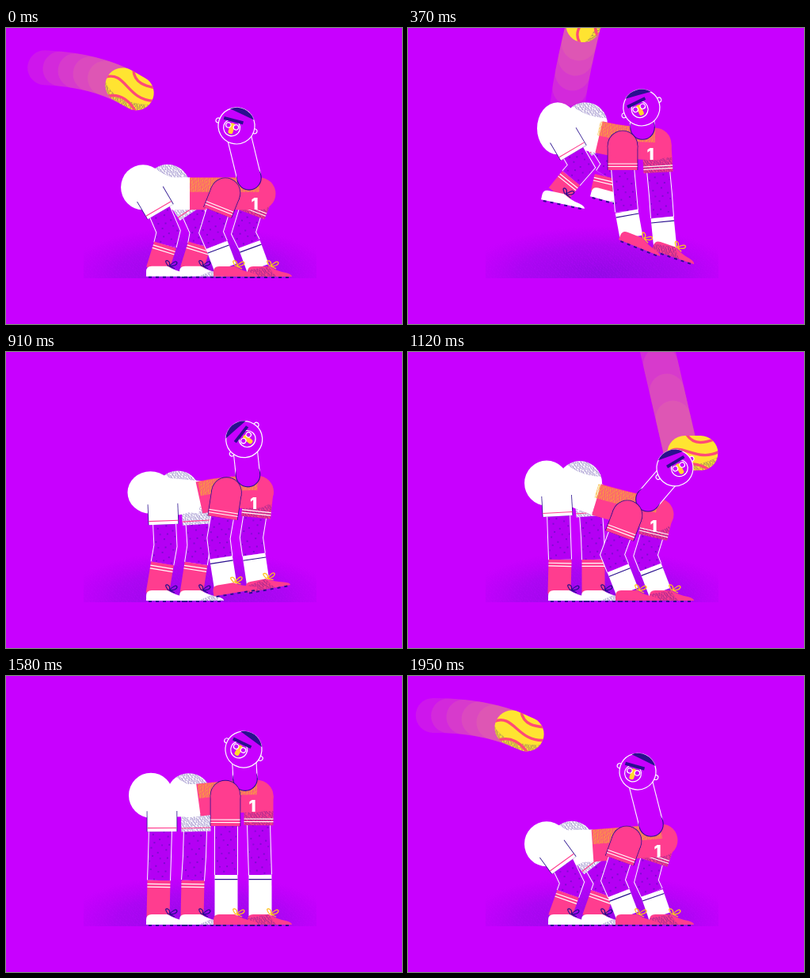
An HTML page without scripts for the animation above (2000 ms loop, 500 by 375 pixels).

```html
<!DOCTYPE html>
<html lang="en">
<head>
<meta charset="utf-8">
<title>Four-legged footballer</title>
<style>
html, body { margin: 0; width: 100%; height: 100%; overflow: hidden; background: #c800ff; }
svg { display: block; width: 100vw; height: 100vh; }
use { fill: none; }
.rim { stroke: #fff; stroke-width: 30; }
.skin { stroke: #b400f4; stroke-width: 28; }
.freckle { stroke: url(#freckles); stroke-width: 26; }
.pink { stroke: #ff3d8f; stroke-width: 29; }
.white { stroke: #fff; stroke-width: 29; }
.bands { stroke: #fff; stroke-width: 29; stroke-dasharray: 0 4 1.2 2.5 1.2 999; }
.band { stroke: #2a0f8f; stroke-width: 29; stroke-dasharray: 0 5 1.2 999; }
.edge { stroke: #2a0f8f; stroke-width: 38.6; }
.shorts { stroke: #fff; stroke-width: 37; }
.hem { stroke: #ff3d8f; stroke-width: 37; stroke-dasharray: 0 4 1.1 999; }
.sleeve { stroke: #ff3d8f; stroke-width: 37; marker-end: url(#knob); }
.sleeve-edge { marker-end: url(#knob-edge); }
.cuff { stroke: #fff; stroke-width: 37; stroke-dasharray: 0 4 1.1 2.4 1.1 999; }
.shade { stroke: url(#grain); stroke-width: 37; }
.trail { fill: none; stroke: #f0b060; stroke-width: 44; stroke-linecap: round; stroke-linejoin: round; }
.trail use { stroke-opacity: .12; }
text { font: 900 20px Inter, Roboto, sans-serif; fill: #fff; text-anchor: middle; }
</style>
</head>
<body>
<svg viewBox="0 0 500 375" preserveAspectRatio="none">
<defs>
  <pattern id="grain" width="23" height="12" patternUnits="userSpaceOnUse" patternTransform="rotate(-24)">
    <path d="M0 1H23M-3 3H23M-8 5H23M-1 7H23M-6 9H23M-4 11H23" stroke="#2a0f8f" stroke-width="1.1" stroke-dasharray="1.1 1.7 1.2 2.6 1 1.2"/>
  </pattern>
  <pattern id="gold" width="23" height="12" patternUnits="userSpaceOnUse" patternTransform="rotate(17)">
    <path d="M0 1H23M-3 3H23M-8 5H23M-1 7H23M-6 9H23M-4 11H23" stroke="#f7b52e" stroke-width="1.7" stroke-dasharray="2 1 1.4 .8 2.4 1.2"/>
  </pattern>
  <pattern id="freckles" width="19" height="17" patternUnits="userSpaceOnUse" patternTransform="rotate(8)">
    <path d="M3 2v2M12 7v2M6 12v2M16 14v1.6" stroke="#4a0fb0" stroke-width="1"/>
  </pattern>
  <radialGradient id="dusk" cx=".5" cy=".95" r=".6">
    <stop offset="0" stop-color="#7a10e0" stop-opacity=".55"/>
    <stop offset=".6" stop-color="#8a10e8" stop-opacity=".38"/>
    <stop offset="1" stop-color="#a808f2" stop-opacity="0"/>
  </radialGradient>
  <radialGradient id="fade" cx=".5" cy=".9" r=".55">
    <stop offset="0" stop-color="#fff" stop-opacity=".3"/>
    <stop offset="1" stop-color="#fff" stop-opacity="0"/>
  </radialGradient>
  <mask id="haze"><rect x="98" y="215" width="294" height="102" fill="url(#fade)"/></mask>
  <clipPath id="ballClip"><rect x="-32" y="-22" width="64" height="44" rx="22"/></clipPath>
  <marker id="knob" markerUnits="userSpaceOnUse" overflow="visible"><circle r="18.5" fill="#ff3d8f"/></marker>
  <marker id="knob-edge" markerUnits="userSpaceOnUse" overflow="visible"><circle r="19.3" fill="#2a0f8f"/></marker>
  <marker id="chest" markerUnits="userSpaceOnUse" overflow="visible"><circle r="20.5" fill="#ff3d8f"/></marker>
  <marker id="collar" markerUnits="userSpaceOnUse" overflow="visible"><circle r="15.8" fill="#2a0f8f"/></marker>
  <marker id="throat" markerUnits="userSpaceOnUse" overflow="visible"><circle r="14.7" fill="#c800ff"/></marker>

  <!-- flight paths run from exit back to entry, so each dash starts at the ball -->
  <path id="lob" pathLength="600" d="M260 -180L235 -60C213 30 203 70 200 115C140 38 20 45 -60 58"/>
  <path id="shot" pathLength="670" d="M760 128H345L288 -120"/>

  <g id="ball" clip-path="url(#ballClip)">
    <rect x="-32" y="-22" width="64" height="44" fill="#ffe431"/>
    <path d="M-32 6Q-10 26 34 4V24H-32Z" fill="url(#grain)"/>
    <path d="M-34 2C-16 -18 4 14 34 -2M-8 -24C2 -8 18 -14 30 -18M-22 24C-8 8 10 14 22 22" fill="none" stroke="#ff4a78" stroke-width="3.4"/>
  </g>

  <g id="shoe">
    <path d="M0 0V-6Q0 -13 7 -13H27Q37 -7 48 -5Q56 -3 56 0Z"/>
    <path d="M3 1H54" stroke="#2a0f8f" stroke-width="2" stroke-dasharray="4 5"/>
  </g>
  <path id="lace" d="M28 -13Q22 -21 27 -20Q31 -18 29 -13Q38 -22 39 -17Q38 -13 29 -13L36 -10" fill="none" stroke-width="1.3"/>

  <!-- hind legs: n near, f far; c cloth, l leg, s sock -->
  <path id="hnc"><animate attributeName="d" dur="2s" repeatCount="indefinite" keyTimes="0;.185;.35;.56;.645;.79;.975;1" values="M195 233L178 204;M209 158L190 126;M209 229L208 190;M189 208L187 170;M193 214L190 178;M197 197L197 158;M197 240L178 214;M195 233L178 204"/></path>
  <path id="hnl"><animate attributeName="d" dur="2s" repeatCount="indefinite" keyTimes="0;.185;.35;.56;.645;.79;.975;1" values="M193 230L205 258L201 275;M208 156L219 175L206 190;M210 226L212 256L203 273;M190 205L191 235L192 263;M194 211L197 239L196 265;M195 194L194 228L193 259;M195 237L207 262L202 276;M193 230L205 258L201 275"/></path>
  <path id="hns"><animate attributeName="d" dur="2s" repeatCount="indefinite" keyTimes="0;.185;.35;.56;.645;.79;.975;1" values="M201 275L191 307;M206 190L189 211;M203 273L191 307;M192 263L191 307;M196 265L191 307;M193 259L192 307;M202 276L191 307;M201 275L191 307"/></path>
  <path id="hfc"><animate attributeName="d" dur="2s" repeatCount="indefinite" keyTimes="0;.185;.35;.56;.645;.79;.975;1" values="M235 234L215 204;M247 151L226 122;M252 229L250 190;M231 208L228 170;M236 214L234 178;M240 197L239 158;M237 240L215 212;M235 234L215 204"/></path>
  <path id="hfl"><animate attributeName="d" dur="2s" repeatCount="indefinite" keyTimes="0;.185;.35;.56;.645;.79;.975;1" values="M235 231L247 258L244 275;M246 150L260 172L250 188;M252 226L254 256L246 273;M231 205L233 235L234 263;M236 211L240 239L239 265;M239 194L238 228L236 259;M236 237L250 262L245 276;M235 231L247 258L244 275"/></path>
  <path id="hfs"><animate attributeName="d" dur="2s" repeatCount="indefinite" keyTimes="0;.185;.35;.56;.645;.79;.975;1" values="M244 275L234 307;M250 188L245 209;M246 273L234 307;M234 263L234 307;M239 265L234 307;M236 259L235 307;M245 276L234 307;M244 275L234 307"/></path>

  <!-- front legs -->
  <path id="fnc"><animate attributeName="d" dur="2s" repeatCount="indefinite" keyTimes="0;.185;.35;.56;.645;.79;.975;1" values="M267 234L277 209;M271 180L271 149;M280 187L280 148;M267 233L277 207;M273 196L272 161;M277 190L277 151;M267 234L276 209;M267 234L277 209"/></path>
  <path id="fnl"><animate attributeName="d" dur="2s" repeatCount="indefinite" keyTimes="0;.185;.35;.56;.645;.79;.975;1" values="M268 230L259 259L266 275;M271 177L274 210L276 232;M279 184L279 215L278 247;M268 230L258 257L265 274;M274 193L275 225L276 256;M278 187L278 220L278 252;M268 231L259 259L266 275;M268 230L259 259L266 275"/></path>
  <path id="fns"><animate attributeName="d" dur="2s" repeatCount="indefinite" keyTimes="0;.185;.35;.56;.645;.79;.975;1" values="M266 275L277 304;M276 232L282 265;M278 247L278 294;M265 274L277 304;M276 256L277 304;M278 252L278 304;M266 275L277 304;M266 275L277 304"/></path>
  <path id="ffc"><animate attributeName="d" dur="2s" repeatCount="indefinite" keyTimes="0;.185;.35;.56;.645;.79;.975;1" values="M309 236L319 210;M316 183L314 149;M322 184L322 148;M309 235L316 206;M315 197L313 167;M319 189L319 152;M310 236L319 209;M309 236L319 210"/></path>
  <path id="ffl"><animate attributeName="d" dur="2s" repeatCount="indefinite" keyTimes="0;.185;.35;.56;.645;.79;.975;1" values="M308 234L300 260L307 274;M316 180L319 212L321 240;M321 181L320 212L320 240;M308 232L300 258L306 273;M315 194L317 226L318 258;M319 186L320 220L321 252;M308 233L301 260L308 275;M308 234L300 260L307 274"/></path>
  <path id="ffs"><animate attributeName="d" dur="2s" repeatCount="indefinite" keyTimes="0;.185;.35;.56;.645;.79;.975;1" values="M307 274L318 304;M321 240L325 280;M320 240L319 284;M306 273L318 304;M318 258L319 304;M321 252L321 304;M308 275L318 304;M307 274L318 304"/></path>

  <path id="back"><animate attributeName="d" dur="2s" repeatCount="indefinite" keyTimes="0;.185;.35;.56;.645;.79;.975;1" values="M195 210L233 210;M195 128L242 138;M200 191L252 181;M190 168L239 187;M195 176L238 173;M200 158L244 157;M195 216L234 215;M195 210L233 210"/></path>
  <path id="torso"><animate attributeName="d" dur="2s" repeatCount="indefinite" keyTimes="0;.185;.35;.56;.645;.79;.975;1" values="M232 210Q276 210 320 210;M241 138Q275 146 312 147;M250 182Q285 155 320 148;M238 187Q275 198 315 206;M236 173Q275 168 312 167;M243 157Q280 152 317 152;M233 215Q276 212 320 208;M232 210Q276 210 320 210"/></path>
  <path id="neck"><animate attributeName="d" dur="2s" repeatCount="indefinite" keyTimes="0;.185;.35;.56;.645;.79;.975;1" values="M307 190L291 124;M296 126L295 101;M308 124L264 74;M303 187L337 147;M299 142L334 124;M302 130L300 93;M307 188L290 121;M307 190L291 124"/></path>
</defs>

<path d="M98 317V215H392V317Z" fill="url(#dusk)"/>
<rect x="98" y="215" width="294" height="102" fill="url(#grain)" mask="url(#haze)"/>

<!-- ball in flight -->
<g class="trail">
  <animate attributeName="stroke-dashoffset" begin="-.5s" dur="2s" repeatCount="indefinite" keyTimes="0;.06;.225;.25;.355;.435;.53;1" values="-600;-570;-390;-372;-311;-177;0;0"/>
  <use href="#lob" stroke-dasharray="35 999"/>
  <use href="#lob" stroke-dasharray="55 999"/>
  <use href="#lob" stroke-dasharray="75 999"/>
  <use href="#lob" stroke-dasharray="95 999"/>
  <use href="#lob" stroke-dasharray="115 999"/>
</g>
<g class="trail">
  <animate attributeName="stroke-dashoffset" dur="2s" repeatCount="indefinite" keyTimes="0;.45;.555;.56;.645;.75;1" values="-670;-670;-416;-402;-216;0;0"/>
  <use href="#shot" stroke-dasharray="60 999"/>
  <use href="#shot" stroke-dasharray="95 999"/>
  <use href="#shot" stroke-dasharray="130 999"/>
  <use href="#shot" stroke-dasharray="165 999"/>
  <use href="#shot" stroke-dasharray="200 999"/>
</g>
<g>
  <use href="#ball"/>
  <animateMotion begin="-.5s" dur="2s" repeatCount="indefinite" calcMode="linear" rotate="auto-reverse" keyTimes="0;.06;.225;.25;.355;.435;.53;1" keyPoints="1;.95;.65;.62;.518;.295;0;0"><mpath href="#lob"/></animateMotion>
</g>
<g>
  <use href="#ball"/>
  <animateMotion dur="2s" repeatCount="indefinite" calcMode="linear" rotate="auto-reverse" keyTimes="0;.45;.555;.56;.645;.75;1" keyPoints="1;1;.621;.6;.322;0;0"><mpath href="#shot"/></animateMotion>
</g>

<!-- far side -->
<use href="#hfl" class="rim"/><use href="#hfl" class="skin"/><use href="#hfl" class="freckle"/>
<use href="#hfs" class="pink"/><use href="#hfs" class="bands"/>
<g>
  <animateTransform attributeName="transform" type="translate" dur="2s" repeatCount="indefinite" keyTimes="0;.185;.35;.56;1" values="219 315;230 213;219 315;219 315;219 315"/>
  <animateTransform attributeName="transform" type="rotate" additive="sum" dur="2s" repeatCount="indefinite" keyTimes="0;.185;.35;.56;1" values="0;15;0;0;0"/>
  <use href="#shoe" style="fill:#fff"/><path d="M24 0L40 -7L56 0Z" fill="url(#grain)"/><use href="#lace" stroke="#2a0f8f"/>
</g>
<use href="#hfc" class="shorts"/><use href="#hfc" class="shade" stroke-dasharray="22 999"/><use href="#hfc" class="hem"/>
<g>
  <animateTransform attributeName="transform" type="translate" dur="2s" repeatCount="indefinite" keyTimes="0;.185;.35;.56;.645;.79;.975;1" values="204 201;224 122;217 191;217 166;221 174;231 151;207 212;204 201"/>
  <circle r="28" fill="#fff"/><path d="M-16 -23A28 28 0 0 1 27 -8Q2 -9 -16 -23Z" fill="url(#grain)"/>
</g>

<use href="#ffl" class="rim"/><use href="#ffl" class="skin"/><use href="#ffl" class="freckle"/>
<use href="#ffs" class="white"/><use href="#ffs" class="band"/>
<g>
  <animateTransform attributeName="transform" type="translate" dur="2s" repeatCount="indefinite" keyTimes="0;.185;.35;.56;1" values="305 315;308 281;303 295;305 315;305 315"/>
  <animateTransform attributeName="transform" type="rotate" additive="sum" dur="2s" repeatCount="indefinite" keyTimes="0;.185;.35;.56;1" values="0;19;-21;0;0"/>
  <use href="#shoe" style="fill:#ff3d8f"/><path d="M0 -8L26 -13L36 0H0Z" fill="url(#grain)"/><use href="#lace" stroke="#ffc21f"/>
</g>
<use href="#ffc" class="sleeve"/><use href="#ffc" class="shade" stroke-dasharray="18 999"/><use href="#ffc" class="cuff"/>

<!-- body -->
<use href="#back" stroke="#fff" stroke-width="41"/>
<use href="#torso" stroke="#ff3d8f" stroke-width="41" marker-end="url(#chest)"/>
<use href="#torso" transform="translate(0 -11)" stroke="url(#gold)" stroke-width="18"/>
<text>1<animateTransform attributeName="transform" type="translate" dur="2s" repeatCount="indefinite" keyTimes="0;.185;.35;.56;.645;.79;.975;1" values="314 230;306 167;315 170;310 228;307 181;311 172;315 229;314 230"/></text>

<!-- neck and head -->
<use href="#neck" stroke="#fff" stroke-width="31.4" marker-start="url(#collar)"/>
<use href="#neck" stroke="#c800ff" stroke-width="29.2" marker-start="url(#throat)"/>
<g stroke="#fff" stroke-width="1.2" fill="#c800ff">
  <animateTransform attributeName="transform" type="translate" dur="2s" repeatCount="indefinite" keyTimes="0;.185;.35;.56;.645;.79;.975;1" values="291 124;295 101;264 74;337 147;334 124;300 93;290 121;291 124"/>
  <animateTransform attributeName="transform" type="rotate" additive="sum" dur="2s" repeatCount="indefinite" keyTimes="0;.185;.35;.56;.645;.79;.975;1" values="17;-24;-71;-29;23;28;18;17"/>
  <circle cx="-24" r="3"/><circle cx="24" r="3"/><circle r="23"/>
  <path d="M-14 -18.5A23 23 0 0 1 19 -13.5Q4 -16 -14 -18.5Z" fill="#2a0f8f" stroke="none"/>
  <g>
    <animateTransform attributeName="transform" type="translate" dur="2s" repeatCount="indefinite" keyTimes="0;.185;.35;.56;.645;.79;.975;1" values="-5 4;-3 1;1 2;5 3;0 6;-5 3;-5 4;-5 4"/>
    <circle r="10.5" fill="none"/>
    <path d="M-13 -9L12 -10" stroke="#2a0f8f" stroke-width="4"/>
    <rect x="-3" y="-6" width="6" height="14" rx="2.5" fill="#ffd92b" stroke="none"/>
    <circle cx="-5" cy="-2" r="3.2"/><circle cx="5" cy="-2" r="3.2"/>
  </g>
</g>

<!-- near side -->
<use href="#hnl" class="rim"/><use href="#hnl" class="skin"/><use href="#hnl" class="freckle"/>
<use href="#hns" class="pink"/><use href="#hns" class="bands"/>
<g>
  <animateTransform attributeName="transform" type="translate" dur="2s" repeatCount="indefinite" keyTimes="0;.185;.35;.56;1" values="177 315;168 217;177 315;177 315;177 315"/>
  <animateTransform attributeName="transform" type="rotate" additive="sum" dur="2s" repeatCount="indefinite" keyTimes="0;.185;.35;.56;1" values="0;12;0;0;0"/>
  <use href="#shoe" style="fill:#fff"/><use href="#lace" stroke="#2a0f8f"/>
</g>
<path fill="#fff"><animate attributeName="d" dur="2s" repeatCount="indefinite" keyTimes="0;.185;.35;.56;.645;.79;.975;1" values="M145 202a28 28.5 0 1 0 56 0a28 28.5 0 1 0 -56 0;M163 127a26 33 0 1 0 52 0a26 33 0 1 0 -52 0;M160 190a30 25 0 1 0 60 0a30 25 0 1 0 -60 0;M147 166a28 28.5 0 1 0 56 0a28 28.5 0 1 0 -56 0;M148 174a28 28.5 0 1 0 56 0a28 28.5 0 1 0 -56 0;M155 151a28 28.5 0 1 0 56 0a28 28.5 0 1 0 -56 0;M147 213a28 28.5 0 1 0 56 0a28 28.5 0 1 0 -56 0;M145 202a28 28.5 0 1 0 56 0a28 28.5 0 1 0 -56 0"/></path>
<use href="#hnc" class="edge" stroke-dasharray="26 999"/><use href="#hnc" class="shorts"/><use href="#hnc" class="hem"/>

<use href="#fnl" class="rim"/><use href="#fnl" class="skin"/><use href="#fnl" class="freckle"/>
<use href="#fns" class="white"/><use href="#fns" class="band"/>
<g>
  <animateTransform attributeName="transform" type="translate" dur="2s" repeatCount="indefinite" keyTimes="0;.185;.35;.56;1" values="262 315;266 268;263 304;262 315;262 315"/>
  <animateTransform attributeName="transform" type="rotate" additive="sum" dur="2s" repeatCount="indefinite" keyTimes="0;.185;.35;.56;1" values="0;22;-19;0;0"/>
  <use href="#shoe" style="fill:#ff3d8f"/><use href="#lace" stroke="#ffc21f"/>
</g>
<use href="#fnc" class="edge sleeve-edge"/><use href="#fnc" class="sleeve"/><use href="#fnc" class="cuff"/>
</svg>
</body>
</html>
```
